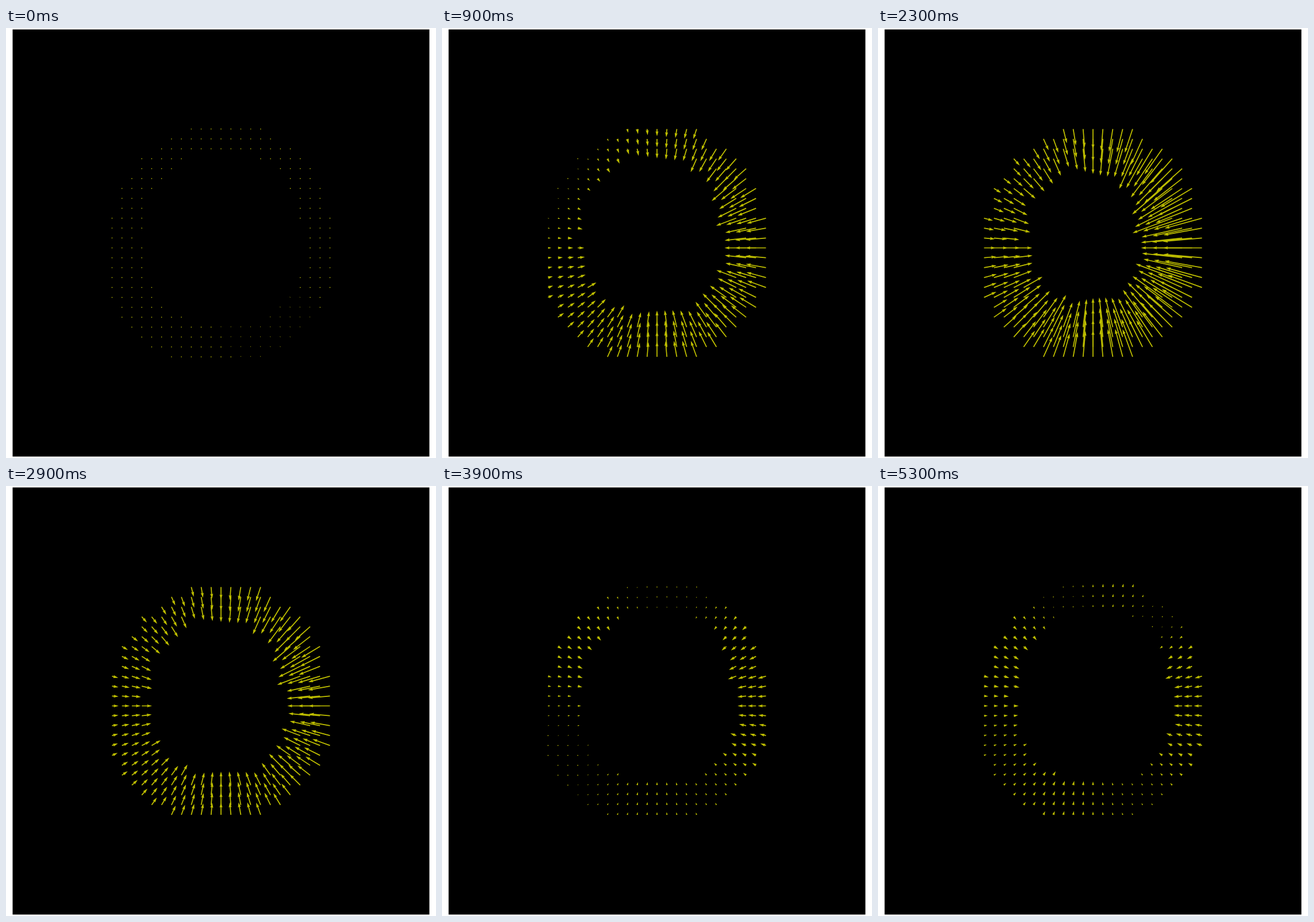
An HTML page with a canvas that plays this animation: 748x748 px, repeating every 5.4 s.

```html
<!DOCTYPE html>
<html lang="en">
<head>
<meta charset="utf-8">
<title>Vector field</title>
<style>
html, body { margin: 0; width: 100%; height: 100%; overflow: hidden; background: #fff; }
canvas { display: block; width: 748px; height: 748px; }
</style>
</head>
<body>
<canvas id="stage" width="748" height="748"></canvas>
<script>
const ctx = document.getElementById('stage').getContext('2d');
const LOOP = 5400, TICK = 100;
const CX = 374, CY = 382.5, STEP = 17.23;
const WIDTH = 1.74; // shaft width; heads scale with it

// Inward pull around the ring: mean, then cos and sin weights of each harmonic
const POSES = [
  { at: 0, wave: [0.9, 0.5, 0.8] },
  { at: 500, wave: [2, 10, 8, 1.5, 0.8] },
  { at: 900, wave: [21.9, 14.7, 5.5, 0, -2.9] },
  { at: 2300, wave: [46, 22.9, 2.3, 0.5, -4.4] },
  { at: 3400, wave: [8, 3.3, -6.5, 1.4, -0.4, 1.7, -2.2] },
  { at: 4400, wave: [6, 3.1, 4.3, 4.4, 1.5, 2.1, -2.7] },
  { at: 5300, wave: [6, 0.6, 2.3, 4.9, 1, 2.9, -2.5] }
];
const TERMS = 7;

// The ring: a tall oval with a flattened hole, each a little uneven by quadrant
function inRing(col, row) {
  const left = col < 0, upper = row < 0;
  const rim = upper ? (left ? 127.2 : 131.3) : (left ? 150 : 139);
  const hole = left ? 77.9 : upper ? 80.5 : 87;
  const inside = col ** 2 + 0.87 * (row + 0.5) ** 2 < rim;
  const hollow = Math.abs(row + 1) < 9 &&
    (Math.abs(col) + 0.8) ** 2 + 0.9 * (row + 0.9) ** 2 < hole;
  return inside && !hollow;
}

const points = [];
for (let row = -12; row < 12; row++) {
  for (let col = -11; col < 12; col++) {
    if (!inRing(col, row)) continue;
    const x = col * STEP, y = row * STEP;
    points.push({ x, y, r: Math.hypot(x, y), angle: Math.atan2(y, x) });
  }
}

// Monotone cubic through the poses, for one wave term
function termAt(k, t) {
  const last = POSES.length - 2;
  const value = i => POSES[i].wave[k] || 0;
  const span = i => POSES[i + 1].at - POSES[i].at;
  const secant = i => (value(i + 1) - value(i)) / span(i);
  const slope = i => {
    if (i === 0 || i > last) return secant(Math.min(i, last));
    const p = secant(i - 1), q = secant(i);
    return p * q > 0 ? 2 * p * q / (p + q) : 0;
  };
  let i = 0;
  while (i < last && t >= POSES[i + 1].at) i++;
  const u = (t - POSES[i].at) / span(i), v = 1 - u;
  return value(i) * v * v * (1 + 2 * u) + value(i + 1) * u * u * (3 - 2 * u) +
    span(i) * u * v * (slope(i) * v - slope(i + 1) * u);
}

// Pull weakens outwards, most of all on the upper left
function pullAt(p, wave) {
  let pull = wave[0];
  for (let n = 1; 2 * n < TERMS; n++) {
    pull += wave[2 * n - 1] * Math.cos(n * p.angle) + wave[2 * n] * Math.sin(n * p.angle);
  }
  const falloff = 0.18 * wave[0] * (1 - 0.65 * Math.cos(p.angle - 0.96));
  return pull - falloff * (p.r - 175) / 50;
}

function polygon(list) {
  ctx.beginPath();
  list.forEach(([x, y]) => ctx.lineTo(x, y));
  ctx.closePath();
  ctx.fill();
}

const HEXAGON = Array.from({ length: 6 }, (_, n) =>
  [Math.cos(n * Math.PI / 3) / 2, Math.sin(n * Math.PI / 3) / 2]);

function arrow(p, pull) {
  const len = Math.abs(pull) / WIDTH;
  ctx.save();
  ctx.translate(CX + p.x, CY + p.y);
  ctx.rotate(p.angle + (pull > 0 ? Math.PI : 0));
  ctx.scale(WIDTH, WIDTH);
  if (len < 1) {
    polygon(HEXAGON);
  } else {
    const k = Math.min(1, len / 5), tip = Math.max(len, 5);
    ctx.scale(k, k);
    polygon([[0, 0.5], [tip - 4.5, 0.5], [tip - 5, 1.5], [tip, 0],
             [tip - 5, -1.5], [tip - 4.5, -0.5], [0, -0.5]]);
  }
  ctx.restore();
}

function draw(t) {
  ctx.fillStyle = '#fff';
  ctx.fillRect(0, 0, 748, 748);
  ctx.fillStyle = '#000';
  ctx.fillRect(11.5, 2.5, 725, 743);
  ctx.fillStyle = '#bfbf00';
  const wave = Array.from({ length: TERMS }, (_, k) => termAt(k, t));
  for (const p of points) arrow(p, pullAt(p, wave));
}

const start = performance.now();
function loop() {
  const t = (performance.now() - start) % LOOP;
  draw(Math.floor(t / TICK) * TICK);
  requestAnimationFrame(loop);
}
loop();
</script>
</body>
</html>
```
